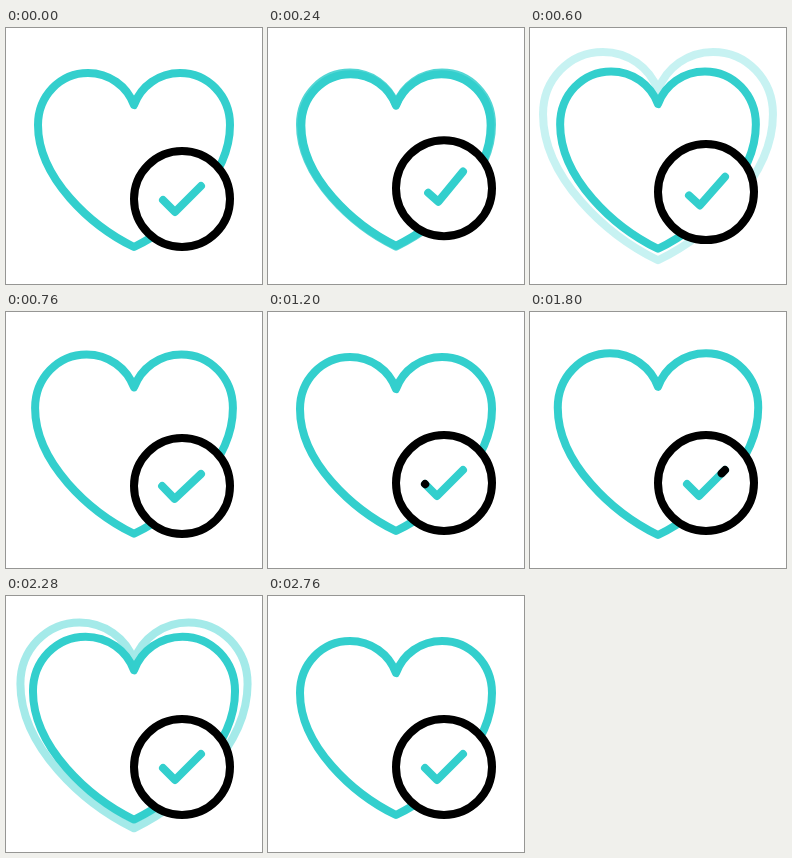
These frames come from a looping animation (256 px wide and 256 px high, 3000 ms). An HTML page with a canvas:

```html
<!DOCTYPE html>
<html lang="en">
<head>
<meta charset="utf-8">
<title>Heart check</title>
<style>
  html, body { margin: 0; width: 100%; height: 100%; overflow: hidden; background: #fff; }
  canvas { display: block; width: 100vw; height: 100vh; }
</style>
</head>
<body>
<canvas id="stage"></canvas>
<script>
const SIZE = 256, LOOP = 3000, STEP = 40, LINE = 8;
const TEAL = '#33cfcd', BLACK = '#000';
const canvas = document.getElementById('stage');
const ctx = canvas.getContext('2d');

const heart = new Path2D(
  'M128 77 C121 58 103 45 82 45 C54 45 32 68 32 97 C32 150 85 198 128 219 ' +
  'C171 198 224 150 224 97 C224 68 202 45 174 45 C153 45 135 58 128 77 Z');
const BADGE = { x: 176, y: 171, r: 48, lift: 24 };

// Both scale about the middle column; the echo spreads from a lower point
const CENTER = 128, ECHO_Y = 155;

// Tick corners relative to the badge centre: at rest and at the top of the jump
const TICK_REST = [[-19, 1], [-7, 13], [19, -13]];
const TICK_JUMP = [[-12, 9], [-4, 14], [19, -21]];

// [time, value] keys, eased between neighbours
const PULSE = [[100, 1], [400, 0.969], [700, 1.037], [920, 1],
               [1200, 1], [1500, 0.98], [2040, 1.09], [2580, 1]];
const JUMP = [[100, 0], [400, 1], [740, -0.13], [920, 0]];
const ECHO_STARTS = [140, 1930], ECHO_TIME = 630, ECHO_GROW = 0.213;

const clamp = v => Math.min(1, Math.max(0, v));
const smooth = u => u * u * (3 - 2 * u);
const mix = (a, b, u) => a + (b - a) * u;
const ramp = (t, from, to) => smooth(clamp((t - from) / (to - from)));

function keyed(keys, t) {
  let value = keys[0][1];
  for (let i = 1; i < keys.length; i++) {
    const [t0, v0] = keys[i - 1], [t1, v1] = keys[i];
    if (t >= t0) value = mix(v0, v1, ramp(t, t0, t1));
  }
  return value;
}

function scaleAbout(y, scale) {
  ctx.translate(CENTER, y);
  ctx.scale(scale, scale);
  ctx.translate(-CENTER, -y);
}

function drawHeart(pulse, spread = 1, alpha = 1) {
  ctx.save();
  ctx.globalAlpha = alpha;
  scaleAbout(ECHO_Y, spread);
  scaleAbout(CENTER, pulse);
  ctx.lineWidth = LINE / (pulse * spread);
  ctx.strokeStyle = TEAL;
  ctx.stroke(heart);
  ctx.restore();
}

function drawTick(points, color) {
  ctx.beginPath();
  points.forEach(([x, y]) => ctx.lineTo(x, y));
  ctx.strokeStyle = color;
  ctx.stroke();
}

function drawTrail(t) {
  if (t < 1200 || t >= 1880) return;
  const [a, b, c] = TICK_REST;
  const length = Math.hypot(b[0] - a[0], b[1] - a[1]) + Math.hypot(c[0] - b[0], c[1] - b[1]);
  const head = ramp(t, 1180, 1600) * length;
  const tail = ramp(t, 1400, 1890) * length;
  ctx.setLineDash([Math.max(0.01, head - tail), 999]);
  ctx.lineDashOffset = -tail;
  drawTick(TICK_REST, BLACK);
  ctx.setLineDash([]);
}

function drawBadge(t) {
  const jump = keyed(JUMP, t);
  ctx.save();
  ctx.translate(BADGE.x, BADGE.y - BADGE.lift * jump);
  ctx.beginPath();
  ctx.arc(0, 0, BADGE.r, 0, Math.PI * 2);
  ctx.fillStyle = '#fff';
  ctx.fill();
  ctx.strokeStyle = BLACK;
  ctx.stroke();
  drawTick(TICK_REST.map((p, i) => p.map((v, k) => mix(v, TICK_JUMP[i][k], jump))), TEAL);
  drawTrail(t);
  ctx.restore();
}

function draw(t) {
  const dpr = window.devicePixelRatio || 1;
  const w = Math.round(innerWidth * dpr), h = Math.round(innerHeight * dpr);
  if (canvas.width !== w || canvas.height !== h) {
    canvas.width = w;
    canvas.height = h;
  }
  ctx.setTransform(w / SIZE, 0, 0, h / SIZE, 0, 0);
  ctx.fillStyle = '#fff';
  ctx.fillRect(0, 0, SIZE, SIZE);
  ctx.lineWidth = LINE;
  ctx.lineCap = ctx.lineJoin = 'round';

  const pulse = keyed(PULSE, t);
  for (const start of ECHO_STARTS) {
    const u = (t - start) / ECHO_TIME;
    if (u > 0 && u < 0.97) drawHeart(pulse, 1 + ECHO_GROW * smooth(u), 1 - u);
  }
  drawHeart(pulse);
  drawBadge(t);
}

const begin = performance.now();
function tick() {
  const t = (performance.now() - begin) % LOOP;
  draw(Math.floor(t / STEP) * STEP);
  requestAnimationFrame(tick);
}
tick();
</script>
</body>
</html>
```
